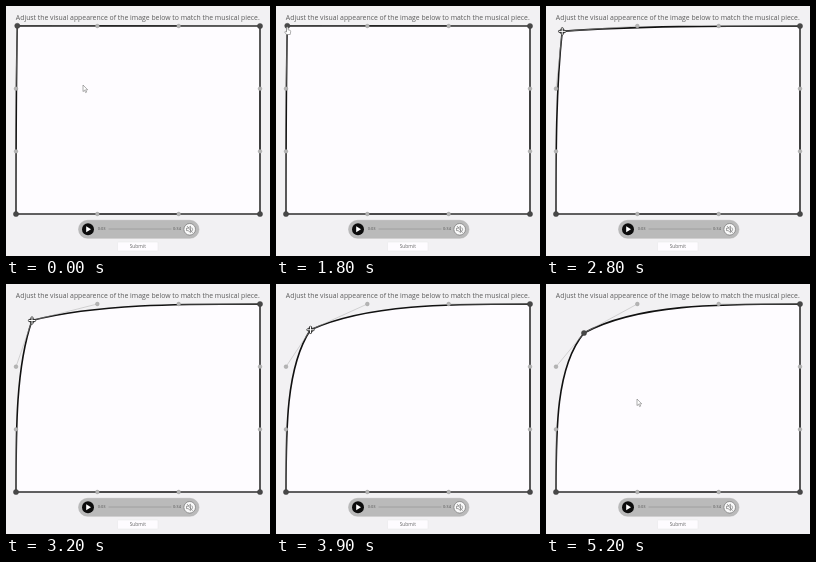
Animation, 264 px wide and 250 px high, one loop 5.6 s. Source, as an HTML page:

```html
<!DOCTYPE html>
<html lang="en">
<head>
<meta charset="utf-8">
<style>
html, body { margin: 0; width: 100%; height: 100%; overflow: hidden; background: #f2f1f3; }
svg { display: block; width: 264px; height: 250px; font-family: "Open Sans", "Noto Sans", sans-serif; }
.pointer { fill: #fff; stroke: #777; stroke-width: .6; stroke-linejoin: round; }
</style>
</head>
<body>
<svg viewBox="0 0 264 250">
  <text x="131.8" y="13.5" font-size="6.86" text-anchor="middle" fill="#5c5c5c">Adjust the visual appearence of the image below to match the musical piece.</text>

  <path id="shape" fill="#fefcff" stroke="#111" stroke-width="1.6"/>
  <path id="handles" fill="none" stroke="#aaa" stroke-opacity=".6" stroke-width=".8"/>
  <g id="controls" fill="#b4b4b4" stroke="#9a9a9a" stroke-width=".4"></g>
  <g id="corners" fill="#484848" stroke="#3c3c3c" stroke-width=".4"></g>

  <rect x="72.5" y="214.3" width="120.5" height="18" rx="9" fill="#bababa" stroke="#b0b0b0" stroke-width=".5"/>
  <circle cx="82" cy="223.3" r="6" fill="#0c0c0c"/>
  <path d="M80.2 220.3v6l4.8-3z" fill="#fff"/>
  <g font-size="4" fill="#555">
    <text x="91.7" y="224.4">0:03</text>
    <text x="167" y="224.4">0:34</text>
  </g>
  <path d="M102.5 223H165.5" stroke="#999" stroke-width=".8"/>
  <circle cx="183.7" cy="223.3" r="5.8" fill="#fafafa" stroke="#666" stroke-width=".6"/>
  <path d="M180.5 222.2h1.6l2.4-2v6.4l-2.4-2h-1.6zM185.8 221.5q1.6 2 0 3.8M181 220l5.6 6.8" fill="none" stroke="#666" stroke-width=".6"/>

  <rect x="111.5" y="236" width="40.5" height="9" rx=".8" fill="#fefcff" stroke="#e6e6e6" stroke-width=".5"/>
  <text x="131.8" y="242.3" font-size="4.9" text-anchor="middle" fill="#666">Submit</text>

  <g id="cursor" class="pointer">
    <path id="arrow" d="M0 0v6.6l1.5-1.4 1.1 2.4 1.1-.5-1.1-2.3H4.7z"/>
    <path id="hand" d="M-.8 1q.8-1.2 1.6 0v2.2l2 .5q.7.3.6 1.2l-.5 3h-3.8l-1.7-2.6q.2-.9 1.8 0z"/>
    <g id="move">
      <path d="M-3.6 0H3.6M0-3.6V3.6" stroke="#222" stroke-width="2.2"/>
      <path id="tip" d="M0-4.4l1.6 2h-3.2z" fill="#333" stroke="none"/>
      <use href="#tip" transform="rotate(90)"/>
      <use href="#tip" transform="rotate(180)"/>
      <use href="#tip" transform="rotate(270)"/>
      <path d="M-3.4 0H3.4M0-3.4V3.4" stroke="#fff" stroke-width="1"/>
    </g>
  </g>
</svg>
<script>
const LOOP = 5600, STEP = 100;
const LEFT = 10, RIGHT = 254, TOP = 20, BOTTOM = 208;
const GRAB = 2500, DROP = 4200;
const $ = id => document.getElementById(id);
const linear = p => p;
const smooth = p => p * p * (3 - 2 * p);
const mix = (a, b, p) => a.map((v, i) => v + (b[i] - v) * p);

const corners = [[LEFT, TOP], [RIGHT, TOP], [RIGHT, BOTTOM], [LEFT, BOTTOM]];
const controls = corners.flatMap((c, i) => {
  const next = corners[(i + 1) % 4];
  return [mix(c, next, 1 / 3), mix(c, next, 2 / 3)];
});

const cornerHome = [11.3, 19.8], mouseHome = [77, 79];
const drags = [
  { from: 2600, to: 3200, goal: [26, 36.5] },
  { from: 3200, to: 3600, goal: [29.3, 41] },
  { from: 3600, to: 4100, goal: [38, 49] }
];
const glides = [
  { from: 100, to: 700, goal: [22.3, 31.3] },
  { from: 700, to: 1300, goal: [12, 22] },
  { from: 1300, to: 1800, goal: [11.3, 20.6] },
  { from: GRAB, to: DROP, goal: [38, 49] },
  { from: 4500, to: 5200, goal: [91, 115] }
];

function follow(home, moves, ease, t) {
  return moves.reduce((pos, { from, to, goal }) => {
    const p = Math.min(1, Math.max(0, (t - from) / (to - from)));
    return mix(pos, goal, ease(p));
  }, home);
}

function cursorKind(t) {
  if (t >= GRAB && t < DROP) return "move";
  return t >= 1300 && t < 4700 ? "hand" : "arrow";
}

const dots = (points, r) => points.map(([x, y]) => `<circle cx="${x}" cy="${y}" r="${r}"/>`).join("");

function draw(now) {
  const t = Math.floor(now % LOOP / STEP) * STEP;
  const kind = cursorKind(t);
  const tip = follow(cornerHome, drags, linear, t);
  const mouse = kind === "move" ? tip : follow(mouseHome, glides, smooth, t);
  const points = [tip, ...corners.slice(1)];

  $("shape").setAttribute("d", `M${tip}C${controls[0]} ${controls[1]} ${corners[1]}` +
    `V${BOTTOM}H${LEFT}C${controls[6]} ${controls[7]} ${tip}Z`);
  $("handles").setAttribute("d", points.map((p, i) =>
    `M${controls[(2 * i + 7) % 8]}L${p}L${controls[2 * i]}`).join(""));
  $("corners").innerHTML = dots(points, 2.6);
  $("cursor").setAttribute("transform", `translate(${mouse})`);
  for (const id of ["arrow", "hand", "move"]) $(id).style.display = id === kind ? "" : "none";
  requestAnimationFrame(() => draw(performance.now() - start));
}

$("controls").innerHTML = dots(controls, 1.9);
const start = performance.now();
draw(0);
</script>
</body>
</html>
```
